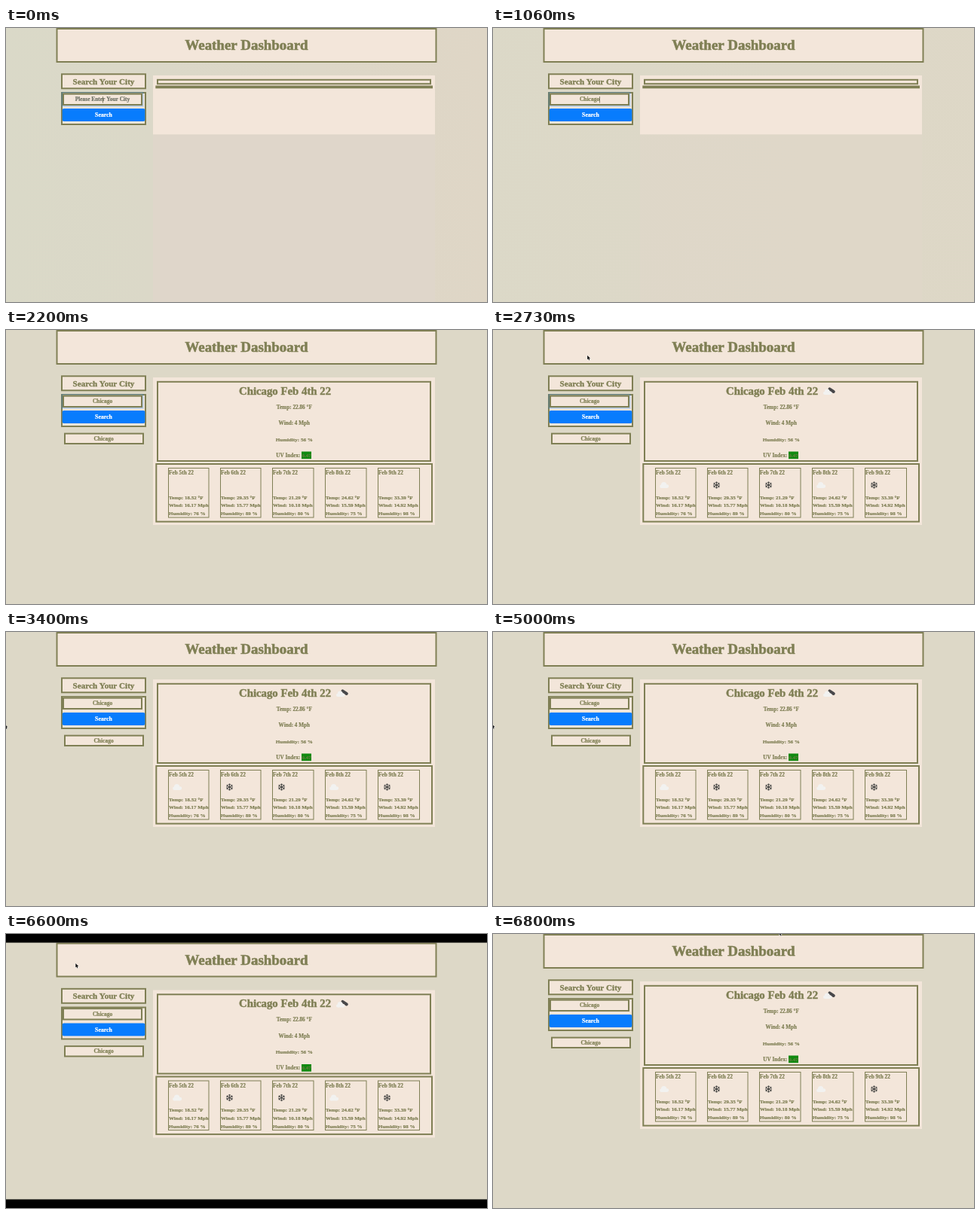
These frames come from a looping animation (638x364 px, 6.93 s). An HTML page with a canvas:

```html
<!DOCTYPE html>
<html lang="en">
<head>
<meta charset="utf-8">
<title>Weather Dashboard</title>
<style>
html, body { margin: 0; width: 100%; height: 100%; overflow: hidden; background: #ddd8c7; }
canvas { display: block; width: 638px; height: 364px; }
</style>
</head>
<body>
<canvas id="stage"></canvas>
<script>
const W = 638, H = 364, LOOP = 6930;
const BG = '#ddd8c7', CREAM = '#f3e6da', OLIVE = '#7f7f54';
const canvas = document.getElementById('stage');
const ctx = canvas.getContext('2d');
const dpr = window.devicePixelRatio || 1;
canvas.width = W * dpr;
canvas.height = H * dpr;

const TYPED = 'Chicago';
const KEY_TIMES = [60, 330, 460, 660, 800, 1000, 1060];
const SUBMIT = 1660, RESULT = 2200, ICONS = 2400;

const DAYS = [
  { x: 215, w: 54.5, day: 5, temp: '18.52', wind: '16.17', hum: 76, icon: cloud },
  { x: 284, w: 54.5, day: 6, temp: '29.35', wind: '15.77', hum: 89, icon: snowflake },
  { x: 353, w: 55.5, day: 7, temp: '21.29', wind: '10.18', hum: 80, icon: snowflake },
  { x: 423, w: 55.5, day: 8, temp: '24.62', wind: '15.59', hum: 75, icon: cloud },
  { x: 493, w: 56, day: 9, temp: '33.39', wind: '14.92', hum: 98, icon: snowflake }
];

// Pointer runs: [time, x, y] of the arrow tip
const POINTER = [
  [[2400, 143, 92], [2560, 138, 62], [2730, 125.5, 33.5], [2900, 62, 74],
   [3060, 3, 112], [3400, -1.6, 122.5], [4330, -1.6, 122.5]],
  [[5000, -1.6, 122.5], [5300, 40, 76], [5600, 92, 31], [5660, 92, 31]],
  [[5930, 92.3, 39], [6630, 92.3, 39], [6800, 379.5, -4], [LOOP, 379.5, -4]]
];

// Vertical shift of the page between the black bars
const SHIFT = [[5800, 0], [5930, 11.5], [6620, 11.5], [6790, 0]];

function lerpKeys(keys, t) {
  if (t <= keys[0][0]) return keys[0].slice(1);
  for (let i = 1; i < keys.length; i++) {
    const a = keys[i - 1], b = keys[i];
    if (t <= b[0]) {
      const k = (t - a[0]) / (b[0] - a[0]);
      return a.slice(1).map((v, j) => v + (b[j + 1] - v) * k);
    }
  }
  return keys[keys.length - 1].slice(1);
}

function fill(x, y, w, h, color) {
  ctx.fillStyle = color;
  ctx.fillRect(x, y, w, h);
}

function box(x, y, w, h, line = 2, bg = CREAM) {
  fill(x, y, w, h, bg);
  ctx.strokeStyle = OLIVE;
  ctx.lineWidth = line;
  ctx.strokeRect(x + line / 2, y + line / 2, w - line, h - line);
}

function text(str, x, y, size, color = OLIVE, align = 'center') {
  ctx.font = `bold ${size}px "Liberation Serif", "Noto Serif", serif`;
  ctx.textAlign = align;
  ctx.fillStyle = ctx.strokeStyle = color;
  ctx.lineWidth = size * 0.03;
  const base = y + size * 0.33;
  ctx.fillText(str, x, base);
  ctx.strokeText(str, x, base);
  return ctx.measureText(str).width;
}

function cloud(x, y, s = 1, color = '#f2f2f0') {
  ctx.fillStyle = color;
  ctx.beginPath();
  ctx.arc(x - 3.6 * s, y + 1.7 * s, 2.3 * s, 0, 7);
  ctx.arc(x - 0.4 * s, y - 0.4 * s, 3.6 * s, 0, 7);
  ctx.arc(x + 3.8 * s, y + 1.6 * s, 2.4 * s, 0, 7);
  ctx.fill();
  ctx.fillRect(x - 3.6 * s, y, 7.4 * s, 4 * s);
}

function snowflake(x, y) {
  ctx.save();
  ctx.translate(x + 0.5, y);
  ctx.strokeStyle = '#4a4a48';
  ctx.lineWidth = 0.95;
  for (let i = 0; i < 6; i++) {
    ctx.rotate(Math.PI / 3);
    ctx.beginPath();
    ctx.moveTo(0, 0);
    ctx.lineTo(0, -4.6);
    ctx.moveTo(-1.5, -4);
    ctx.lineTo(0, -2.6);
    ctx.lineTo(1.5, -4);
    ctx.stroke();
  }
  ctx.restore();
}

function brokenClouds(x, y) {
  ctx.strokeStyle = '#48484a';
  ctx.lineCap = 'round';
  ctx.lineWidth = 4;
  ctx.beginPath();
  ctx.moveTo(x + 0.5, y - 2.6);
  ctx.lineTo(x + 5.8, y + 1);
  ctx.stroke();
  ctx.lineCap = 'butt';
  cloud(x - 2.4, y + 1.2, 0.95);
}

function arrow(x, y) {
  const pts = [[0, 0], [0, 5.6], [1.3, 4.5], [2.2, 6.5], [3.1, 6.1], [2.3, 4.1], [4, 4]];
  ctx.beginPath();
  pts.forEach(([px, py]) => ctx.lineTo(x + px, y + py));
  ctx.closePath();
  ctx.strokeStyle = '#fff';
  ctx.lineWidth = 0.9;
  ctx.stroke();
  ctx.fillStyle = '#111';
  ctx.fill();
}

function background(t) {
  fill(0, 0, W, H, BG);
  const tint = Math.max(0, 1 - t / SUBMIT);
  if (!tint) return;
  ctx.globalAlpha = tint;
  const g = ctx.createLinearGradient(0, 0, W, 0);
  g.addColorStop(0, '#dad9c8');
  g.addColorStop(0.3, '#dbd8c8');
  g.addColorStop(1, '#dfd6c6');
  fill(0, 0, W, H, g);
  fill(195, 141, 374, 223, '#dfd6ca');
  ctx.globalAlpha = 1;
}

function sidebar(t) {
  box(73, 60.3, 113, 21);
  text('Search Your City', 129.5, 71, 11.1);

  box(73, 85, 113, 44);
  if (t < 3130) {
    ctx.strokeStyle = 'rgba(0,123,255,.25)';
    ctx.lineWidth = 1.6;
    ctx.strokeRect(74.3, 85.8, 107.4, 18);
  }
  box(75, 86.6, 106, 16.4);
  const count = KEY_TIMES.filter(k => t >= k).length;
  const width = count
    ? text(TYPED.slice(0, count), 128, 95, 7.5)
    : (text('Please Enter Your City', 128, 95, 7.4, '#6f7266'), 0);
  const caret = t < 1460 || (t >= 1860 && t < RESULT);
  if (caret) fill(128 + width / 2, 91, 0.7, 8.5, '#55553c');

  ctx.fillStyle = '#087cfd';
  ctx.beginPath();
  ctx.roundRect(74.7, 107, 109.6, 17, 2);
  ctx.fill();
  text('Search', 129.5, 115.5, 7.8, '#fff');

  if (t >= SUBMIT) {
    box(77, 136.6, 106, 15.4);
    text(TYPED, 129.5, 144.4, 7.5);
  }
}

function current(t) {
  text('Chicago Feb 4th 22', 370, 80.7, 14.8);
  if (t >= ICONS) brokenClouds(446, 81);
  text('Temp: 22.86 °F', 382.3, 102.6, 7.25);
  text('Wind: 4 Mph', 382.3, 124, 7.2);
  text('Humidity: 56 %', 382.3, 145.2, 7.1);
  text('UV Index:', 390.5, 166.5, 7.2, OLIVE, 'right');
  fill(392, 161.5, 13, 9.7, '#108a10');
  text('0.47', 398.5, 166.5, 7, '#5f7f3c');
}

function forecast(t) {
  for (const d of DAYS) {
    box(d.x, 183, d.w, 66.5, 1);
    const row = (str, y, size) => text(str, d.x + 1, y, size, OLIVE, 'left');
    row(`Feb ${d.day}th 22`, 189.6, 7.3);
    if (t >= ICONS) d.icon(d.x + 12, 206);
    row(`Temp: ${d.temp} °F`, 222.5, 7);
    row(`Wind: ${d.wind} Mph`, 233.1, 7);
    row(`Humidity: ${d.hum} %`, 243.7, 7);
  }
}

function page(t) {
  const ready = t >= RESULT;
  box(66.5, 0, 505, 46);
  text('Weather Dashboard', 319, 23.2, 18.9);
  sidebar(t);
  fill(195, 63, 374, (ready ? 259 : t >= SUBMIT ? 163.3 : 141.3) - 63, CREAM);
  box(200, 67.8, 364, ready ? 107.2 : 7.4);
  if (ready) {
    box(198.3, 177, 367.7, 78.6);
    current(t);
    forecast(t);
  } else {
    fill(198.3, 76.5, 367.7, 3.8, OLIVE);
  }
}

function draw(t) {
  ctx.setTransform(dpr, 0, 0, dpr, 0, 0);
  background(t);
  const [shift] = lerpKeys(SHIFT, t);
  ctx.save();
  ctx.translate(0, shift);
  page(t);
  ctx.restore();
  if (shift > 0) {
    fill(0, 0, W, shift, '#000');
    fill(0, H - shift, W, shift, '#000');
  }
  const run = POINTER.find(r => t >= r[0][0] && t < r[r.length - 1][0]);
  if (run) arrow(...lerpKeys(run, t));
}

const start = performance.now();
function tick() {
  draw((performance.now() - start) % LOOP);
  requestAnimationFrame(tick);
}
tick();
</script>
</body>
</html>
```
